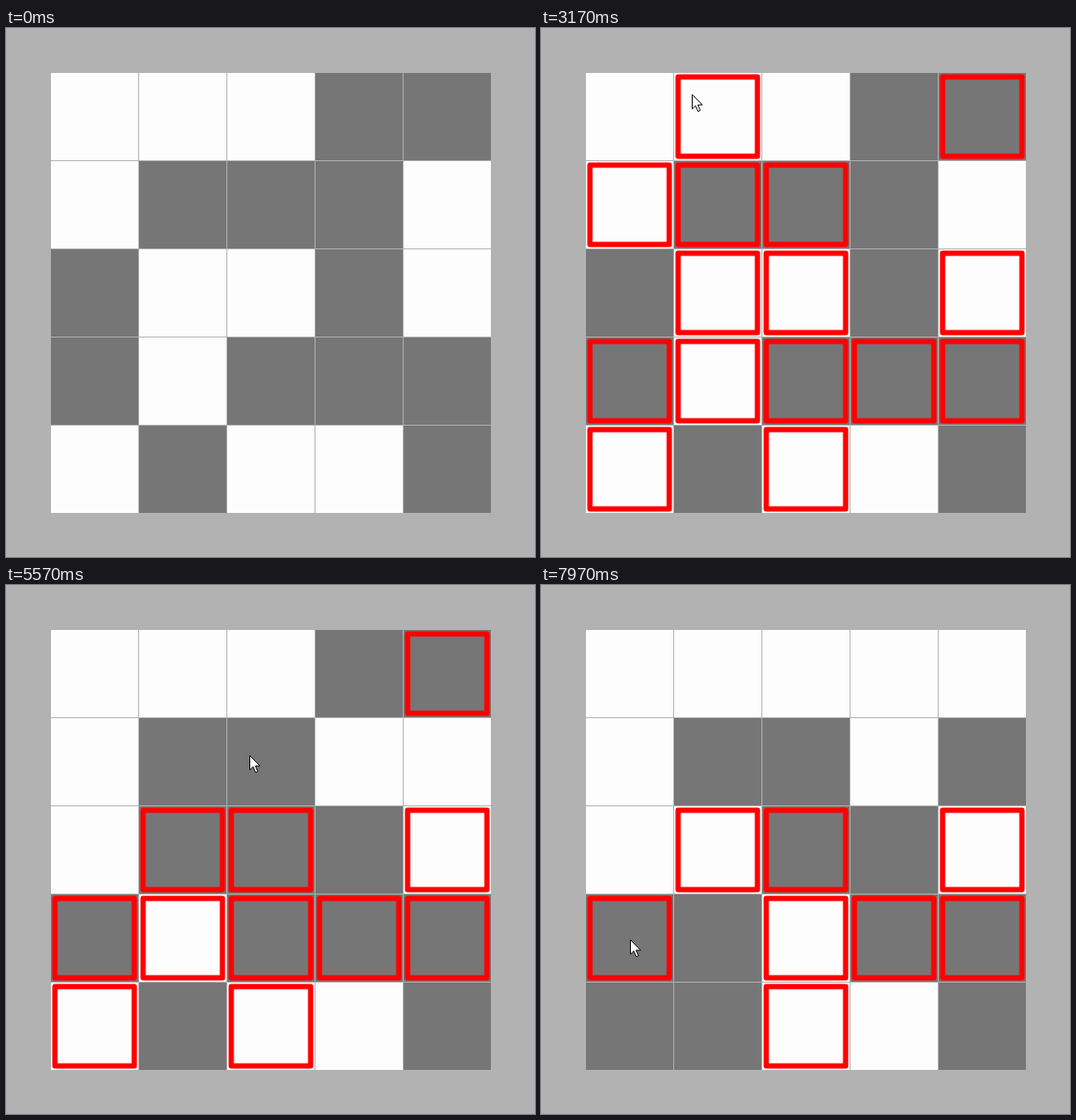
Write an HTML page that moves like this. It is 600x600 px and loops after 8 s.

```html
<!DOCTYPE html>
<html lang="en">
<head>
<meta charset="utf-8">
<title>Lights puzzle</title>
<style>
html, body { margin: 0; width: 100%; height: 100%; overflow: hidden; background: #b2b2b2; }
svg { display: block; width: 100vw; height: 100vh; }
.mark { fill: none; stroke: #f00; stroke-width: 6; stroke-linejoin: round; }
</style>
</head>
<body>
<svg viewBox="0 0 600 600">
  <rect width="600" height="600" fill="#b2b2b2"/>
  <g id="board"></g>
  <path id="cursor" d="M.5 .5V16.8L4.3 13.2 7 19.6 9.6 18.5 6.9 12.2H12Z" fill="#fff" stroke="#000" stroke-linejoin="round"/>
</svg>
<script>
const LOOP = 8000, N = 5, EDGE = 50, CELL = 100;
const CURSOR_IN = 900, HINTS_IN = 1270;
const LIT = '#fdfdfd', DARK = '#767676';

const start = ['11100', '10001', '01101', '01000', '10110'].map(toBits);
const hints = solve(start, toBits('01001'));

// Key points of the pointer tip: time, x, y
const path = [
  [900, 570, 378], [1270, 570, 378], [2080, 525, 284], [2730, 285, 172],
  [2930, 162, 56], [3930, 225, 186], [4500, 106, 187], [4680, 78, 190],
  [5430, 288, 198], [5570, 276, 193], [6290, 462, 118], [6370, 442, 162],
  [6800, 202, 447], [6970, 202, 447], [7550, 96, 525], [7780, 94, 500],
  [7970, 101, 402]
];

// The pressed cell is the one under the pointer at that time
const clicks = [3380, 4060, 4400, 5420, 6280, 6970, 7820].map(time => ({
  time,
  row: Math.floor((along(time, 2) - EDGE) / CELL),
  col: Math.floor((along(time, 1) - EDGE) / CELL)
}));

function toBits(text) {
  return [...text].map(Number);
}

function press(grid, row, col) {
  for (let r = 0; r < N; r++) {
    for (let c = 0; c < N; c++) {
      if (Math.abs(r - row) + Math.abs(c - col) <= 1) grid[r][c] ^= 1;
    }
  }
}

// Chase the dark cells downwards: press below every cell that is still dark
function solve(grid, topRow) {
  const lights = grid.map(row => [...row]);
  const presses = [];
  for (let r = 0; r < N; r++) {
    presses[r] = r ? lights[r - 1].map(lit => 1 - lit) : topRow;
    presses[r].forEach((on, c) => { if (on) press(lights, r, c); });
  }
  return presses;
}

// Tangent that drops to zero at turning points and pauses
function slope(i, k) {
  if (i < 1 || i > path.length - 2) return 0;
  const [a, b, c] = [path[i - 1], path[i], path[i + 1]];
  const before = (b[k] - a[k]) / (b[0] - a[0]);
  const after = (c[k] - b[k]) / (c[0] - b[0]);
  return before * after > 0 ? 2 * before * after / (before + after) : 0;
}

function along(t, k) {
  let i = 0;
  while (i < path.length - 2 && path[i + 1][0] <= t) i++;
  const a = path[i], b = path[i + 1], span = b[0] - a[0];
  const u = Math.min(1, Math.max(0, (t - a[0]) / span));
  const v = 1 - u;
  return v * v * (1 + 2 * u) * a[k] + u * u * (3 - 2 * u) * b[k]
    + span * u * v * (v * slope(i, k) - u * slope(i + 1, k));
}

const board = document.getElementById('board');
const cursor = document.getElementById('cursor');

function addRect(x, y, size, cls) {
  const el = document.createElementNS('http://www.w3.org/2000/svg', 'rect');
  const attrs = { x, y, width: size, height: size, class: cls };
  for (const key in attrs) el.setAttribute(key, attrs[key]);
  return board.appendChild(el);
}

const cells = [];
for (let row = 0; row < N; row++) {
  for (let col = 0; col < N; col++) {
    const x = EDGE + 1 + col * CELL, y = EDGE + 1 + row * CELL;
    cells.push({
      row, col,
      face: addRect(x, y, CELL - 1, 'cell'),
      mark: addRect(x + 4.5, y + 4.5, CELL - 10, 'mark')
    });
  }
}

const show = (el, on) => el.setAttribute('visibility', on ? 'visible' : 'hidden');

function draw(t) {
  const lights = start.map(row => [...row]);
  const left = hints.map(row => [...row]);
  for (const { time, row, col } of clicks) {
    if (t < time) break;
    press(lights, row, col);
    left[row][col] = 0;
  }
  for (const { row, col, face, mark } of cells) {
    face.setAttribute('fill', lights[row][col] ? LIT : DARK);
    show(mark, t >= HINTS_IN && left[row][col]);
  }
  show(cursor, t >= CURSOR_IN);
  cursor.setAttribute('transform',
    `translate(${Math.round(along(t, 1))} ${Math.round(along(t, 2))})`);
}

const origin = performance.now();
function tick() {
  draw((performance.now() - origin) % LOOP);
  requestAnimationFrame(tick);
}
draw(0);
requestAnimationFrame(tick);
</script>
</body>
</html>
```
